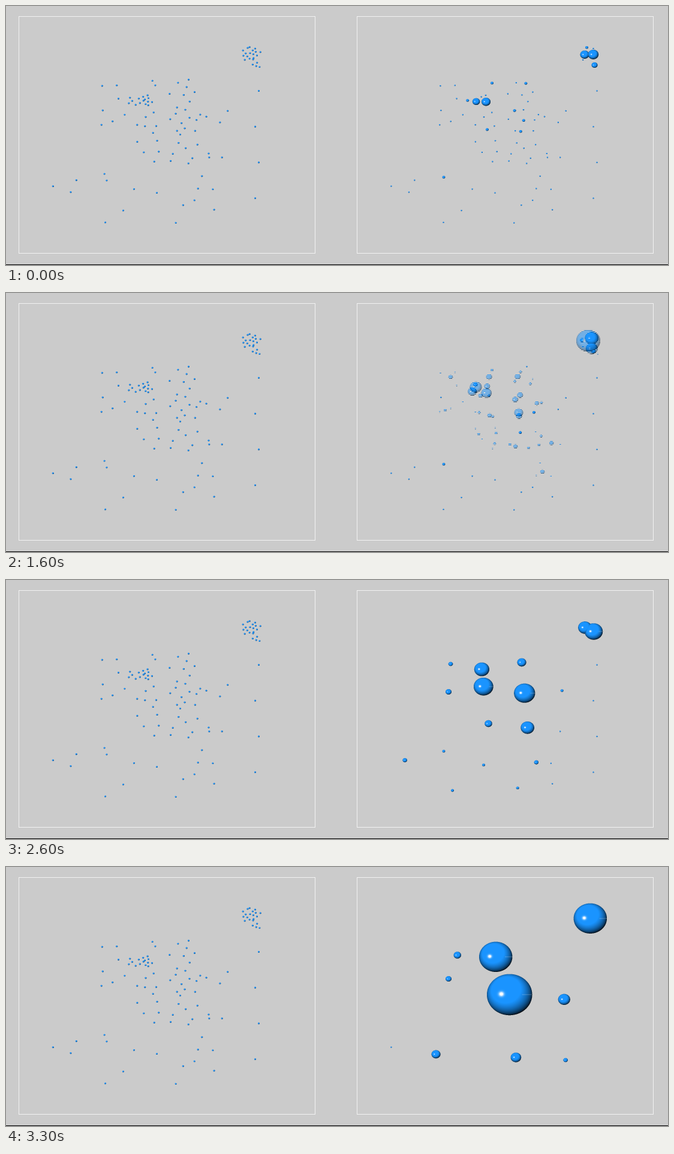
These frames come from a looping animation (1104x432 px, 3400 ms). A matplotlib script:

```python
import numpy as np
import matplotlib.pyplot as plt
from matplotlib.animation import FuncAnimation

W, H, DPI = 1104, 432, 100
STEP_MS, STEPS = 100, 34
SS = 3                       # supersampling
SHIFT = 564                  # distance between the two panels
PANEL = (21.0, 17.55, 495.0, 395.5)
ASPECT = 1.25
GREY = 203
BLUE = np.array([26, 148, 255.0])
LIGHT = np.array([-0.2, -0.3, 0.93])
GOLDEN = np.pi * (3 - 5**0.5)

# Patches of the scatter: centre, number of points, spread.
PATCHES = [
    (407.5, 79, 17, 6.5), (417, 98, 4, 3), (232, 157, 11, 5), (209, 159, 4, 4),
    (297, 140, 7, 11), (297, 191, 12, 13), (353, 184, 3, 10),
    (301, 245, 8, 14), (349, 252, 2, 6), (240, 239, 5, 12),
    (173.5, 186, 4, 11), (237, 195, 6, 10), (177, 139.5, 3, 10),
    (246, 128, 2, 3), (326, 304, 4, 12), (232, 308, 2, 11),
    (180, 350.5, 2, 11), (100.7, 300, 3, 11), (165.5, 285, 2, 4),
    (308, 344, 3, 18)]

# Each grid takes over at its start step; half a step means an interlaced change.
DIVISIONS = [25, 24, 22, 20, 17, 15, 13, 11, *range(10, 3, -1)]
STARTS = [0, 3, 6.5, 9, 12, 14, 16.5, 18, 20.5, 22, 24, 26, 28, 30.5, 32.5]


def patch(rng, cx, cy, count, spread):
    """Jittered golden-angle spiral with exactly the given mean and spread."""
    k = np.arange(count)
    angle = GOLDEN * k + rng.uniform(0, 2 * np.pi)
    radius = np.sqrt((k + 0.5) / count)
    xy = np.stack([radius * np.cos(angle), radius * np.sin(angle)], axis=1)
    xy += rng.normal(0, 0.08, xy.shape)
    xy -= xy.mean(axis=0)
    return (cx, cy) + xy * (ASPECT, 1) * spread / xy.std()


def make_points():
    rng = np.random.default_rng(7)
    column = [(418 + 3 * (-1)**k, 141 + 59.7 * k) for k in range(4)]
    return np.vstack([patch(rng, *p) for p in PATCHES] + [column])


def clusters(n):
    """Merge the points that round to the same node of an n by n grid."""
    x0, y0, w, h = PANEL
    nodes = np.floor((POINTS - (x0, y0)) / (w, h) * n + 0.5)
    _, label, count = np.unique(nodes, axis=0, return_inverse=True,
                                return_counts=True)
    label = label.ravel()
    centres = [POINTS[label == i].mean(axis=0) for i in range(len(count))]
    return zip(centres, count)


def sphere(img, depth, cx, cy, rx, ry):
    """Shade one sphere into the supersampled image, with a depth test."""
    x0, x1 = int((cx - rx) * SS), int((cx + rx) * SS) + 2
    y0, y1 = int((cy - ry) * SS), int((cy + ry) * SS) + 2
    ys, xs = np.mgrid[y0:y1, x0:x1]
    nx = ((xs + 0.5) / SS - cx) / rx
    ny = ((ys + 0.5) / SS - cy) / ry
    rho = nx**2 + ny**2
    nz = np.sqrt(np.clip(1 - rho, 0, 1))
    diffuse = nx * LIGHT[0] + ny * LIGHT[1] + nz * LIGHT[2]
    color = BLUE * np.clip(0.25 + diffuse, 0, 1)[..., None]
    shine = 1.3 * np.exp(-((nx + 0.36)**2 + (ny + 0.03)**2) / 0.012)
    if rx > 13:
        shine += 0.25 * ((abs(ny * ry) < 0.5) & (nx > 0.55))
    color += (255 - color) * np.clip(shine, 0, 1)[..., None]
    z = nz * rx
    show = (rho < 1) & (z > depth[y0:y1, x0:x1])
    img[y0:y1, x0:x1][show] = color[show]
    depth[y0:y1, x0:x1][show] = z[show]


def blank():
    return (np.full((H * SS, W * SS, 3), float(GREY)),
            np.full((H * SS, W * SS), -1.0))


def shrink(img):
    return img.reshape(H, SS, W, SS, 3).mean(axis=(1, 3))


def draw_left():
    img, depth = blank()
    for x, y in POINTS:
        sphere(img, depth, x + 0.5, y + 0.5, 1.6, 1.45)
    return shrink(img)[:, :W // 2]


def draw_frame_lines(img):
    for x in (21, 21 + SHIFT):
        img[[17, 412], x:x + 495] = 242
        img[17:413, [x, x + 494]] = 242
    img[431] = 0


POINTS = make_points()
LEFT = draw_left()
cache = {}


def grid_picture(n):
    if n not in cache:
        img, depth = blank()
        for (x, y), count in clusters(n):
            sphere(img, depth, x + SHIFT + 0.5, y + 0.5,
                   1.26 * count, 1.145 * count)
        img = shrink(img)
        img[:, :W // 2] = LEFT
        draw_frame_lines(img)
        cache[n] = np.rint(img).astype(np.uint8)
    return cache[n]


def picture(step):
    i = np.searchsorted(STARTS, step + 0.5, side="right") - 1
    img = grid_picture(DIVISIONS[i]).copy()
    if STARTS[i] > step:
        img[1::2] = grid_picture(DIVISIONS[i - 1])[1::2]
    return img


fig = plt.figure(figsize=(W / DPI, H / DPI), dpi=DPI)
ax = fig.add_axes([0, 0, 1, 1])
ax.axis("off")
view = ax.imshow(picture(0), interpolation="nearest", aspect="auto")


def update(step):
    view.set_data(picture(step))
    return [view]


anim = FuncAnimation(fig, update, frames=STEPS, interval=STEP_MS,
                     repeat=True, repeat_delay=0, blit=False)
plt.show()
```
